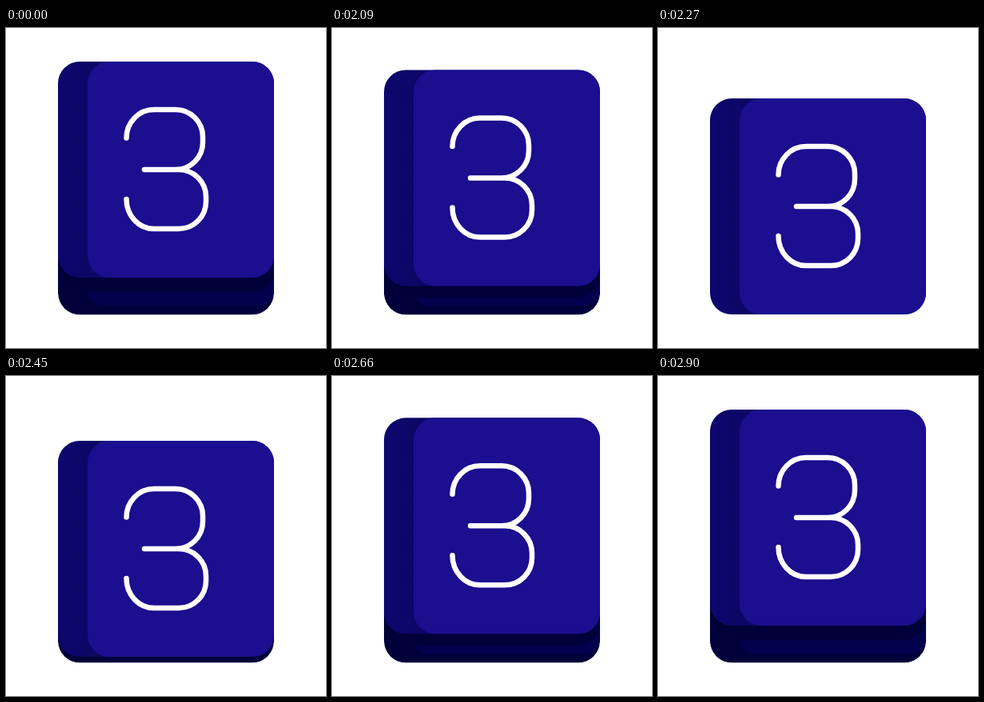
An HTML page that plays this animation: 400 by 400 pixels, repeating every 2.93 s.

```html
<!DOCTYPE html>
<html lang="en">
<head>
<meta charset="utf-8">
<title>Key press</title>
<style>
  html, body { margin: 0; width: 100%; height: 100%; overflow: hidden; background: #fff; }
  svg { display: block; width: 100%; height: 100%; }
</style>
</head>
<body>
<svg viewBox="0 0 400 400">
  <defs>
    <clipPath id="body"><rect x="65" y="42" width="270" height="316.5" rx="27"/></clipPath>
    <linearGradient id="side" gradientUnits="userSpaceOnUse" x1="65" y1="0" x2="108" y2="0">
      <stop offset="0" stop-color="#0d076f"/>
      <stop offset="1" stop-color="#0c0665"/>
    </linearGradient>
  </defs>
  <g clip-path="url(#body)">
    <g id="base">
      <rect x="65" y="88" width="270" height="270.5" rx="27" fill="#02003b"/>
      <rect x="102" y="200" width="233" height="147" rx="20" fill="#03004e"/>
      <rect id="shade" x="65" y="60" width="270" height="270" rx="27" fill="#010038"/>
    </g>
  </g>
  <g id="key">
    <rect x="65" y="42" width="270" height="270" rx="27" fill="url(#side)"/>
    <rect x="102" y="42" width="233" height="270" rx="27" fill="#1b0e8f"/>
    <path fill="none" stroke="#fff" stroke-width="6.5" stroke-linecap="round" stroke-linejoin="round"
      d="M150.5 137.5A34.5 35.5 0 0 1 185 102H212A34 34 0 0 1 246 136V143A34 34 0 0 1 212 177H173
         M212 177H216A34 34 0 0 1 250 211V217A34 34 0 0 1 216 251H185A34.5 37 0 0 1 150.5 214"/>
  </g>
</svg>
<script>
  const LOOP = 2930, STEP = 30, START = 2000, DEPTH = 46.4;
  const [base, shade, key] = ['base', 'shade', 'key'].map(id => document.getElementById(id));
  const clamp = x => Math.min(1, Math.max(0, x));
  const sine = x => (1 - Math.cos(Math.PI * x)) / 2;

  // Cubic bezier easing with control points (a, 0) and (b, 1).
  function bezier(x, a, b) {
    let lo = 0, hi = 1, u = x;
    for (let i = 0; i < 24; i++) {
      u = (lo + hi) / 2;
      const v = 1 - u;
      if (3 * u * v * v * a + 3 * u * u * v * b + u * u * u < x) lo = u; else hi = u;
    }
    return u * u * (3 - 2 * u);
  }

  function pressAt(t) {
    const s = Math.floor((t - START) / STEP) * STEP;
    return s < 300 ? sine(clamp(s / 285)) : 1 - bezier(clamp((s - 300) / 600), .41, .42);
  }

  const move = (el, y) => el.setAttribute('transform', `translate(0 ${y.toFixed(2)})`);

  const begin = performance.now();
  function draw() {
    const p = pressAt((performance.now() - begin) % LOOP);
    move(key, DEPTH * p);
    // The shadow shortens as the key nears the bottom.
    move(shade, (DEPTH - 18) * p);
    base.setAttribute('visibility', p > .99 ? 'hidden' : 'visible');
    requestAnimationFrame(draw);
  }
  draw();
</script>
</body>
</html>
```
